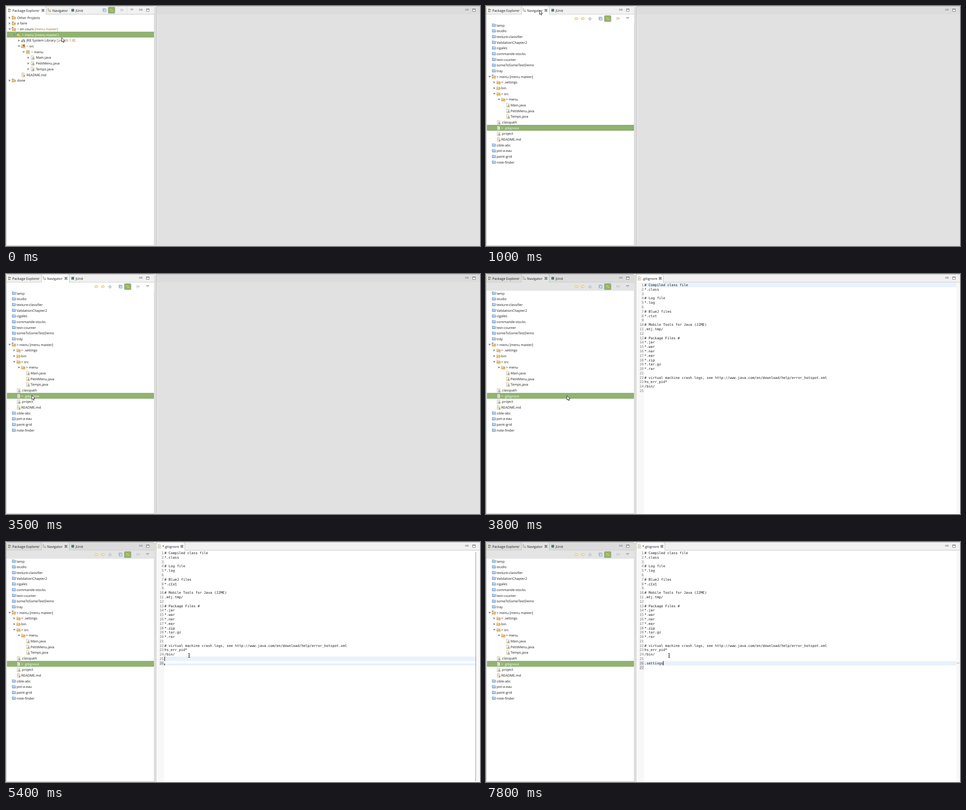
Animation of 1051 by 533 pixels, one loop 8000 ms. Source, as an HTML page:

```html
<!DOCTYPE html>
<html lang="en">
<head>
<meta charset="utf-8">
<title>Ignoring a settings folder</title>
<style>
html, body { margin: 0; width: 100%; height: 100%; overflow: hidden; background: #ededed; }
svg { display: block; width: 100vw; height: 100vh; --bar: #f1f1f1; --tab: #fff; }
svg.away { --bar: #dcdcdc; --tab: #e4e4e4; }
text { font: 7.55px "Open Sans", "Noto Sans", sans-serif; white-space: pre; text-rendering: geometricPrecision; }
.mono { font: 7.65px "DejaVu Sans Mono", monospace; }
.num { text-anchor: end; }
</style>
</head>
<body>
<svg id="stage" viewBox="0 0 1051 533"></svg>
<script>
const INK = '#1c1c1c', GOLD = '#94702f', GREEN = '#91b372', EDGE = '#b4b4b4', LINE = '#e8f2fe';
const BAR = 'var(--bar)', TAB = 'var(--tab)';
const TREE_STEP = 12.68, CODE_STEP = 9.79, CHAR = 4.605, CODE_X = 351.3;

const rect = (x, y, w, h, fill, more = '') => `<rect x="${x}" y="${y}" width="${w}" height="${h}" fill="${fill}" ${more}/>`;
const path = (d, fill, stroke = 'none', w = .8) => `<path d="${d}" fill="${fill}" stroke="${stroke}" stroke-width="${w}"/>`;
const text = (x, y, s, fill = INK, cls = '') => `<text x="${x}" y="${y}" fill="${fill}" class="${cls}">${s}</text>`;
const group = (id, body) => `<g id="${id}">${body}</g>`;

const page = path('M-3-4.3H1.2L3.2-2.3V4.3H-3Z', '#fffdf2', '#a89a72', .7);
const openFolder = path('M-4 3.2V-2.8H-1L0-1.8H3V0', '#fdf0cc', '#b98a3c') + path('M-4 3.3L-2 0H4.4L2.8 3.3Z', '#f3cf85', '#b98a3c');
const badge = rect(.6, .6, 3.6, 3.6, '#d9a441') + rect(1.7, 1.5, 1.5, 1.6, '#fff6dd');
const bluePart = path('M-4-4V-1M-4-4H-1', 'none', '#4a78ad', 1);
const arrowLeft = path('M-4 0L-.5-3.3V-1.5H3.8V1.5H-.5V3.3Z', '#fdf3cf', '#d8b04c');
const icons = {
  set: openFolder + path('M-3.5-4V-1.5M-1.5-4.2V-2', 'none', '#7d6a45', 1),
  project: openFolder + bluePart + badge,
  settled: path('M-3.7 2.6V-3.2H-.8L0-2.4H3.6V2.6Z', '#a3c8f3', '#4a78b4', .75) + path('M-3-1H3', 'none', '#dcebff', 1),
  folder: openFolder,
  tracked: openFolder + badge,
  source: openFolder + rect(-1, -4, 4.5, 4, '#a8703a') + badge,
  pack: rect(-3.6, -3.4, 7, 7, '#c98b55') + path('M-3.6 0H3.4M-.1-3.5V3.6', 'none', '#fff0dc', 1) + badge,
  library: rect(-4, -.5, 2, 4, '#5d8f4b') + rect(-1.7, -3.5, 2, 7, '#d0a03c') + path('M.8-2L2.4-2.4 4.2 3.4H2Z', '#4e6fa8'),
  java: page + path('M.9-2V1.2Q.9 2.7-1.2 2.2', 'none', '#3a64a8', 1) + rect(.9, 1, 3, 3, '#d9a441'),
  file: page + path('M-1.8-1.5H1.6M-1.8 .3H1.8M-1.8 2.1H1.8', 'none', '#7d95bd', .7),
  note: page + path('M-1.8-1.5H1.6M-1.8 .3H1', 'none', '#7d95bd', .7) + rect(.2, .6, 3.6, 3.6, '#d9a441'),
  close: path('M-2.6-2.6L2.6 2.6M2.6-2.6L-2.6 2.6', 'none', '#444', 2.1) + path('M-2-2L2 2M2-2L-2 2', 'none', '#fff', .8),
  min: rect(-3, -1.7, 6, 2.2, '#fff', 'stroke="#666" stroke-width=".8"'),
  max: rect(-3, -2.8, 6, 5.4, '#fff', 'stroke="#666" stroke-width=".8"') + rect(-3, -2.8, 6, 1.2, '#666'),
  menu: path('M-3-1.4H3L0 1.6Z', '#fff', '#666'),
  explorer: rect(-2.6, -3.5, 2.4, 3, '#a06a36') + rect(-2.6, .7, 2.4, 3, '#a06a36') + rect(.8, -2.5, 2, 2, '#5276a8') + rect(.8, 1.5, 2, 2, '#d39d45'),
  navigator: path('M-3.6-3.2H-.8M-2.6-3V2.4H0M-2.6-.2H0', 'none', '#a98b56', .8) + rect(0, -1.4, 3.8, 1.8, '#e4c27c') + rect(0, 1.6, 3.8, 1.8, '#6f98cf'),
  unit: rect(-3, -3, 6, 6, '#4c7d68'),
  collapse: rect(-3.4, -3.4, 5.4, 5.4, '#e6f0fd', 'stroke="#5d8fc9" stroke-width=".8"') + rect(-2, -2, 5.6, 5.6, '#fff', 'stroke="#5d8fc9" stroke-width=".8"') + path('M-.6 .8H2.3', 'none', '#33608f', .9),
  link: rect(-7.3, -6.8, 14.6, 13.6, GREEN, 'rx="1.5" stroke="#7f9f61" stroke-width=".7"') + path('M-4-1.6L-1.6-3.6V-2.4H2.6V-.8H-1.6V.4ZM4 1.9L1.6-.1V1.1H-2.6V2.7H1.6V3.9Z', '#fae9a6', '#b48a2d', .6),
  dim: rect(-3.2, -3, 3, 3, '#c9c9c9') + rect(-3.2, 1, 3, 2.4, '#d5d5d5') + path('M.5-1.5H3.6V1H.5Z', '#e5e5e5', '#b5b5b5', .7),
  up: path('M-3.6 .5L0-3.8 3.6 .5H2V3.2H-2V.5Z', '#d4dbe0', '#a2adb3', .7),
  back: arrowLeft,
  forward: `<g transform="scale(-1 1)">${arrowLeft}</g>`,
  shut: path('M-1.6-2.7L2 0-1.6 2.7Z', '#858585'),
  open: path('M-2.7-1.6H2.7L0 2Z', '#858585')
};
const icon = (name, x, y) => `<g transform="translate(${x} ${y})">${icons[name]}</g>`;

// Row: depth, arrow, icon, label, optional brown suffix
function tree(rows, top, labelX, gold, selected) {
  return rows.map(([depth, arrow, kind, label, suffix], i) => {
    const y = +(top + i * TREE_STEP).toFixed(2), x = depth * 10.35, on = i === selected;
    const mark = label.startsWith('&gt; ') && gold && !on;
    const main = mark ? `<tspan fill="${GOLD}">&gt; </tspan>${label.slice(5)}` : label;
    const tail = suffix ? `<tspan fill="${on ? '#fff' : gold ? GOLD : INK}"> ${suffix}</tspan>` : '';
    return (on ? rect(2, Math.floor(y - 6.5), 326, 13, GREEN) : '') + (arrow ? icon(arrow, x + 8, y) : '') +
      icon(kind, x + 17.6, y) + text(x + labelX, y + 2.7, main + tail, on ? '#fff' : INK);
  }).join('');
}

const explorerRows = [
  [0, 'shut', 'set', 'Other Projects'], [0, 'shut', 'set', 'a faire'],
  [0, 'open', 'project', '&gt; en cours', '[menu master]'],
  [1, 'open', 'project', '&gt; menu', '[menu master]'],
  [2, 'shut', 'library', 'JRE System Library', '[JavaSE-1.8]'],
  [2, 'open', 'source', '&gt; src'], [3, 'open', 'pack', '&gt; menu'],
  ...['Main', 'PetitMenu', 'Temps'].map(n => [4, 'shut', 'java', n + '.java']),
  [2, '', 'note', 'README.md'], [0, 'shut', 'set', 'done']
];
const closed = names => names.split(' ').map(n => [0, '', 'settled', n]);
const navigatorRows = [
  ...closed('lamp studio texture-classifier ValidationChapter2 cigales commande-stocks text-counter someToSomeTestDemo tray'),
  [0, 'open', 'project', '&gt; menu', '[menu master]'],
  [1, 'shut', 'tracked', '&gt; .settings'], [1, 'shut', 'folder', 'bin'],
  [1, 'open', 'tracked', '&gt; src'], [2, 'open', 'tracked', '&gt; menu'],
  ...['Main', 'PetitMenu', 'Temps'].map(n => [3, '', 'java', n + '.java']),
  [1, '', 'java', '.classpath'], [1, '', 'file', '&gt; .gitignore'],
  [1, '', 'java', '.project'], [1, '', 'note', 'README.md'],
  ...closed('cible-abc pot-a-eau paint-grid note-finder')
];
const code = `# Compiled class file
*.class

# Log file
*.log

# BlueJ files
*.ctxt

# Mobile Tools for Java (J2ME)
.mtj.tmp/

# Package Files #
*.jar
*.war
*.nar
*.ear
*.zip
*.tar.gz
*.rar

# virtual machine crash logs, see http://www.java.com/en/download/help/error_hotspot.xml
hs_err_pid*
/bin/`.split('\n');

const lineTop = n => +(19.6 + (n - 1) * CODE_STEP).toFixed(2);
const lineBase = n => +(lineTop(n) + 7.5).toFixed(2);
const number = n => text(349.6, lineBase(n), n, '#787878', 'mono num');
const tools = (names, y) => names.map(([n, x]) => icon(n, x, y)).join('');
const activeTab = (l, r, fill) => path(`M${l} 18.3V3Q${l} .5 ${l + 3} .5H${r - 4}Q${r} .5 ${r} 4V18.3`, fill, EDGE) +
  rect(l + .5, 17.5, r - l - 1, 1.5, fill);
const squiggle = (line, from, len) => {
  let d = `M${CODE_X + from * CHAR} ${lineTop(line) + 9}`;
  for (let i = 0; i < len * 3; i++) d += `l1.535 ${i % 2 ? .9 : -.9}`;
  return path(d, 'none', '#e07b4c', .65);
};

const leftPane = rect(.5, .5, 328.5, 532, '#fff', `rx="3" stroke="${EDGE}"`) + rect(1, 1, 327.5, 17, BAR) +
  path('M1 18.3H328.5', 'none', EDGE, .8);
const paneButtons = (a, b) => icon('min', a, 8.8) + icon('max', b, 9.3);

const explorer = activeTab(.5, 89, TAB) + icon('explorer', 8, 9.5) +
  text(14, 12.5, 'Package Explorer') + icon('close', 82, 9.6) + icon('navigator', 96, 9.2) + text(102.8, 12.5, 'Navigator') +
  tools([['collapse', 218.3], ['link', 234], ['dim', 257]], 9.3) + icon('menu', 279, 8.3) + path('M268.5 1V18', 'none', '#d6d6d6', .7) +
  tree(explorerRows, 26, 24.8, true, 3);
const navigator = rect(1, 18.8, 327.5, 18.4, TAB) + activeTab(78.5, 140.5, TAB) + icon('explorer', 8, 9.5) +
  text(14, 12.5, 'Package Explorer') + icon('navigator', 84.8, 9.2) + text(91, 12.5, 'Navigator') + icon('close', 133, 9.6) +
  tools([['back', 200], ['forward', 215], ['up', 230.5], ['collapse', 254], ['link', 269.8], ['dim', 292.5]], 28) + icon('menu', 314, 27) +
  tree(navigatorRows, 42.8, 23.5, false, 18) +
  group('focus', rect(3.5, 265.5, 323, 10, 'none', 'stroke="#84a567" stroke-width=".9"'));
const rightEdge = path('M1051 .5H336Q332.5 .5 332.5 4V533', 'none', EDGE, 1);
const empty = rect(333, 0, 718, 533, '#e1e1e1') + rect(333, 0, 718, 18, '#dcdcdc') + rightEdge;
const editor = rect(333, 0, 718, 533, '#fff') + rect(333, 0, 718, 18, '#f1f1f1') + path('M333 18.3H1051', 'none', EDGE, .8) +
  rect(333, 18.8, 17.5, 515, '#f8f8f8') + rect(1043, 18.8, 8, 515, '#f8f8f8') +
  group('tab', '') + rightEdge +
  rect(350.8, 0, 692.2, 9.8, LINE, 'id="current"') +
  group('torn', rect(350.8, 269.5, 692.2, 4.7, LINE) + rect(351, 270, 1.3, 4, '#222')) +
  group('changed', rect(340.5, lineTop(26), 10, 9.8, '#dfdfe9')) +
  group('changedNext', rect(340.5, lineTop(27), 10, 9.8, '#dfdfe9') + rect(1044.5, 268, 5, 2, '#dedeea', 'stroke="#bcbccc" stroke-width=".5"')) +
  code.map((s, i) => text(CODE_X, lineBase(i + 1), s, INK, 'mono') + number(i + 1)).join('') + number(25) +
  group('n26', number(26)) + group('n27', number(27)) +
  `<text id="typed" class="mono" x="${CODE_X}" y="${lineBase(26)}" fill="${INK}"></text>` +
  group('spelling', squiggle(8, 2, 4) + squiggle(18, 2, 3)) +
  rect(0, 0, 1.2, 9.6, '#111', 'id="caret"') +
  group('vbar', path('M1041.5 22V529.5H1039.5', 'none', '#aaa', 1.5)) +
  group('hbar', path('M352 530H1041V528', 'none', '#d9d9d9', 1.2));

stage.innerHTML = rect(0, 0, 1051, 533, '#ededed') + leftPane + group('explorer', explorer) + group('navigator', navigator) +
  icon('unit', 148, 9.5) + text(154.3, 12.5, 'JUnit') + paneButtons(299, 314.3) +
  group('empty', empty) + group('editor', editor) + paneButtons(1022, 1037.7) +
  group('pointer', path('M.5 .3V9.8L2.7 7.9 4.3 11.3 5.9 10.6 4.4 7.3H7.4Z', '#fff', '#111', .9)) +
  group('beam', path('M-2-4.5Q0-4.5 0-3.5Q0-4.5 2-4.5M0-3.5V3.5M-2 4.5Q0 4.5 0 3.5Q0 4.5 2 4.5M-1 .5H1', 'none', '#111', 1));

const $ = id => document.getElementById(id);
const show = (id, on) => $(id).style.display = on ? '' : 'none';
const move = (id, [x, y]) => $(id).setAttribute('transform', `translate(${x} ${y})`);
const ease = p => { p = Math.max(0, Math.min(1, p)); return p * p * (3 - 2 * p); };
const mix = (a, b, p) => a.map((v, i) => v + (b[i] - v) * p);
const latest = (steps, t) => steps.reduce((v, [at, next]) => t >= at ? next : v, steps[0][1]);

function pointerAt(t) {
  const tick = Math.floor(t / 100);
  if (t < 1000) return mix([123, 70], [118, 9], ease((tick - 1) / 5));
  if (t < 1900) return mix([118, 9], [63, 264.5], ease((tick - 10) / 8));
  return latest([[1900, [61, 265.5]], [2100, [56.8, 269]], [3800, [179, 270]]], t);
}

let lastName;
function drawTab(name) {
  if (name === lastName) return;
  lastName = name;
  const x = name[0] === '*' ? 390 : 386.3;
  $('tab').innerHTML = activeTab(333, x + 6.5, '#fff') + icon('file', 340, 9.6) + text(346.5, 12.5, name) + icon('close', x, 9.6);
}

function render(t) {
  const inEditor = t >= 4200;
  stage.classList.toggle('away', t >= 3800);
  show('explorer', t < 1000);
  show('navigator', t >= 1000);
  show('focus', t < 3500 && t >= 1000);
  show('empty', t < 3800);
  show('editor', t >= 3800);
  show('pointer', !inEditor);
  show('beam', inEditor);
  move('pointer', pointerAt(t));
  move('beam', t < 4500 ? [392, 248] : [406, 252]);
  drawTab(t < 5400 ? '.gitignore' : '*.gitignore');

  const line = latest([[0, 1], [4800, 24], [5400, 25], [5800, 26]], t);
  const typed = latest([[0, ''], [6400, '.'], [6700, '.se'], [7100, '.sett'], [7400, '.setting'], [7800, '.settings']], t);
  const column = line === 24 ? 5 : typed.length;
  $('typed').textContent = typed;
  $('current').setAttribute('y', lineTop(line));
  $('caret').setAttribute('x', CODE_X - .2 + column * CHAR);
  $('caret').setAttribute('y', lineTop(line));
  show('caret', inEditor);
  show('spelling', t >= 4500);
  show('torn', t >= 5400 && t < 5800);
  for (const id of ['changed', 'n26']) show(id, t >= 5400);
  for (const id of ['changedNext', 'n27']) show(id, t >= 5800);
  show('vbar', inEditor && t < 4500 || t >= 5400 && t < 6400);
  show('hbar', inEditor && t < 4500 || t >= 6400 && t < 6700);
}

const start = performance.now();
function loop() {
  render((performance.now() - start) % 8000);
  requestAnimationFrame(loop);
}
loop();
</script>
</body>
</html>
```
